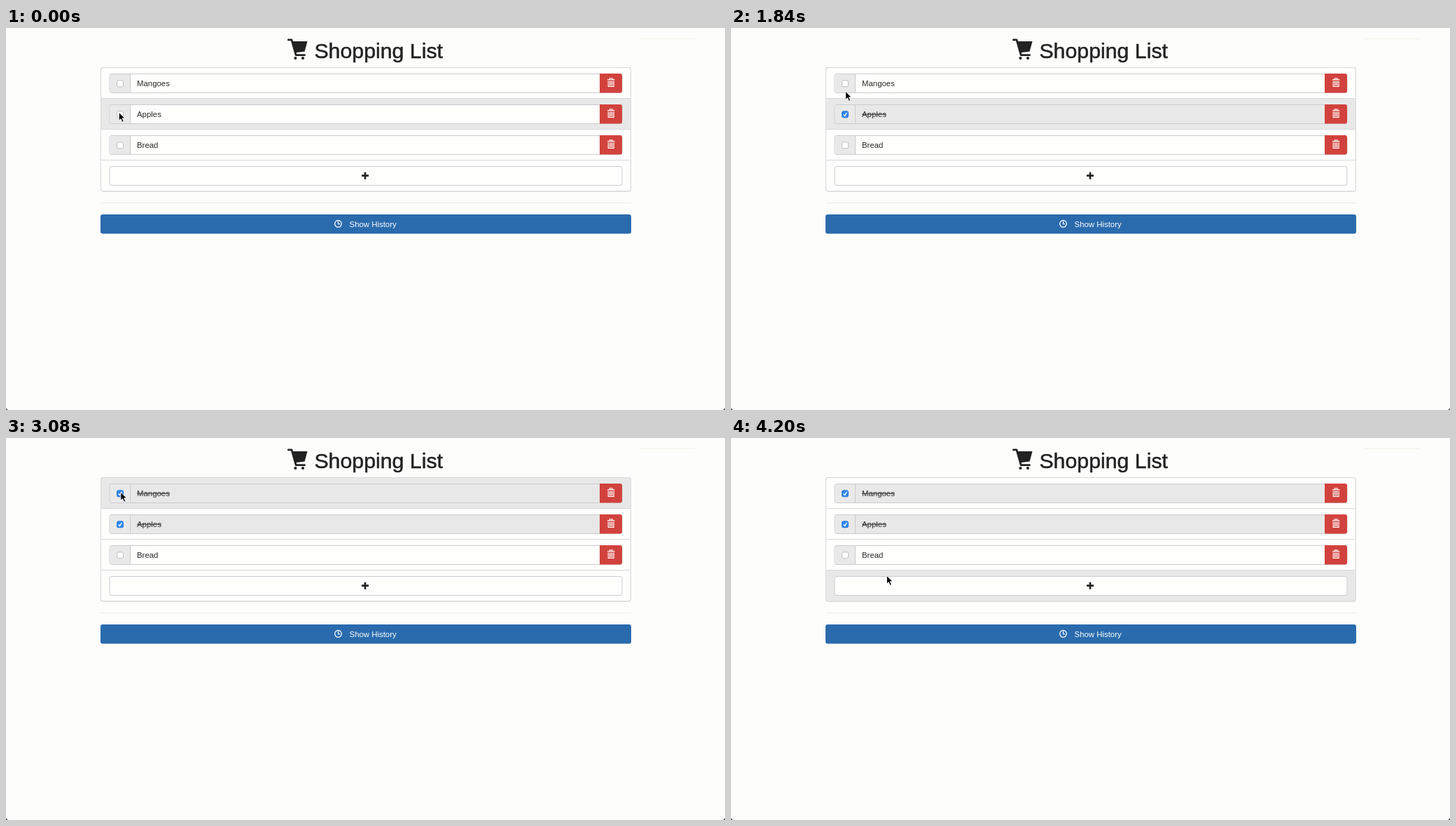
An HTML page for the animation above (4.22 s loop, 1027 by 545 pixels).

```html
<!DOCTYPE html>
<html lang="en">
<head>
<meta charset="utf-8">
<title>Shopping List</title>
<style>
  html, body { margin: 0; width: 100%; height: 100%; overflow: hidden; background: #fdfdfc; }
  svg { display: block; }
  text { font: 11.4px "Liberation Sans", Arial, sans-serif; fill: #2b2b2b; }
  .title { font-size: 30.3px; fill: #222; stroke: #222; stroke-width: .5; }
  .box { fill: #fefefd; stroke: #ccccd0; }
  .line { fill: none; stroke: #d9d9dc; }
  .white { fill: none; stroke: #fff; }
  .tick, .strike { display: none; }
  .done .tick, .done .strike { display: inline; }
  .done .field, .hover .band { fill: #e8e8e8; }
  .done .check { fill: #2f87ee; stroke: #2878dc; }
</style>
</head>
<body>
<svg width="1027" height="545" viewBox="0 0 1027 545">
  <defs>
    <g id="trash" class="white" stroke-width="1.1">
      <path d="M859 73.6h10.4M862.4 73.4v-1.7h3.6v1.7M860.2 75.2v8.2h8v-8.2M862.3 75.5v6.6M864.2 75.5v6.6M866.1 75.5v6.6"/>
    </g>
  </defs>
  <path d="M905 15.5h79" stroke="#f0f0e4"/>
  <g fill="#222">
    <path d="M403.4 16.9h4.6l6.2 21.8h12.3" fill="none" stroke="#222" stroke-width="2.8" stroke-linecap="round" stroke-linejoin="round"/>
    <path d="M408.3 19h22.2l-3.9 14.4-13.6 1.8z"/>
    <circle cx="413.4" cy="43" r="2.1"/><circle cx="424" cy="43" r="2.1"/>
  </g>
  <text class="title" x="440.4" y="43.3">Shopping List</text>

  <rect x="135.5" y="56.5" width="757" height="176.5" rx="3" class="box"/>
  <g id="rows"></g>
  <path class="line" d="M136 100.5h757M136 144.5h757M136 188.5h757"/>
  <rect x="135.5" y="56.5" width="757" height="176.5" rx="3" class="line"/>

  <path d="M135 249.5h758" stroke="#ececec"/>
  <rect x="135" y="266" width="758" height="27.4" rx="3.2" fill="#2a6bad"/>
  <g class="white" stroke-width="1.3">
    <circle cx="474.5" cy="279.3" r="4.8"/>
    <path d="M474.5 276v3.6h2.7"/>
  </g>
  <text x="490.6" y="283.8" style="fill:#fff">Show History</text>
  <path d="M0 542v3h3Q.6 544.4 0 542M1027 542v3h-3q2.4-.6 3-3" fill="#333"/>

  <path id="arrow" d="M0 0v11.6l2.7-2.5 2 4.6 2.1-.9-2-4.5h3.7z" fill="#000" stroke="#fff" stroke-width=".8"/>
  <path id="beam" d="M-3-6q2.6 0 3 1.2Q.4-6 3-6M0-5V5M-3 6q2.6 0 3-1.2Q.4 6 3 6M-1.5 1.5h3" fill="none" stroke="#111" stroke-width="1.1"/>
</svg>
<script>
const LOOP = 4220;
const ROW_HEIGHT = 44;
const items = [
  { name: "Mangoes", width: 47, doneAt: 2700 },
  { name: "Apples", width: 35, doneAt: 800 },
  { name: "Bread", width: 30, doneAt: Infinity },
];
// [time, x, y] of the pointer, and [time, row] under it
const path = [
  [0, 161.3, 120.5], [1680, 161.3, 120.5], [1840, 163.7, 90.5], [1940, 163.7, 90.5],
  [2060, 163.9, 77.5], [3620, 163.9, 77.5], [3800, 206.5, 154], [3900, 206.5, 154],
  [4060, 222.5, 196.5], [LOOP, 222.5, 196.5],
];
const hovers = [[0, 1], [1960, 0], [3900, 2], [4000, 3]];

const byId = id => document.getElementById(id);
const band = '<rect class="band" x="136" y="57" width="756" height="43.5" fill="none"/>';
const itemRow = ({ name, width }) => `
  <rect class="box field" x="148" y="65.5" width="732" height="27" rx="3"/>
  <path d="M178 66h-27q-2.5 0-2.5 2.5v21q0 2.5 2.5 2.5h27z" fill="#e9e9e9"/>
  <path d="M177.5 66v26" stroke="#ccccd0"/>
  <rect class="check" x="158.5" y="74.8" width="9" height="9" rx="2" fill="#fff" stroke="#bdbdbd"/>
  <path class="tick white" d="M160.6 79.5l1.8 2 3.2-4.6" stroke-width="1.4"/>
  <text x="187" y="82.7">${name}</text>
  <path class="strike" d="M187 79.2h${width}" stroke="#333"/>
  <path d="M848 65h29q3 0 3 3v21.5q0 3-3 3h-29z" fill="#d2423d"/>
  <use href="#trash"/>`;
const addRow = `
  <rect class="box" x="148" y="65.5" width="732" height="27" rx="3"/>
  <path d="M508 78.7h10M513 73.7v10" stroke="#222" stroke-width="2.7"/>`;

byId("rows").innerHTML = [...items.map(itemRow), addRow]
  .map((row, i) => `<g transform="translate(0 ${i * ROW_HEIGHT})">${band}${row}</g>`).join("");
const rows = [...byId("rows").children];

function pointerAt(t) {
  const next = path.findIndex(([time]) => time > t);
  const [t0, x0, y0] = path[next - 1];
  const [t1, x1, y1] = path[next];
  const k = (t - t0) / (t1 - t0);
  return [x0 + (x1 - x0) * k, y0 + (y1 - y0) * k];
}

function draw(now) {
  const t = now % LOOP;
  const [x, y] = pointerAt(t);
  const hovered = hovers.filter(([time]) => time <= t).pop()[1];
  rows.forEach((row, i) => {
    row.classList.toggle("hover", i === hovered);
    row.classList.toggle("done", i < items.length && t >= items[i].doneAt);
  });
  const overText = x > 178 && y > 109 && y < 181;
  for (const [id, shown] of [["arrow", !overText], ["beam", overText]]) {
    byId(id).setAttribute("transform", `translate(${x} ${y})`);
    byId(id).style.display = shown ? "inline" : "none";
  }
  requestAnimationFrame(draw);
}
draw(0);
</script>
</body>
</html>
```
